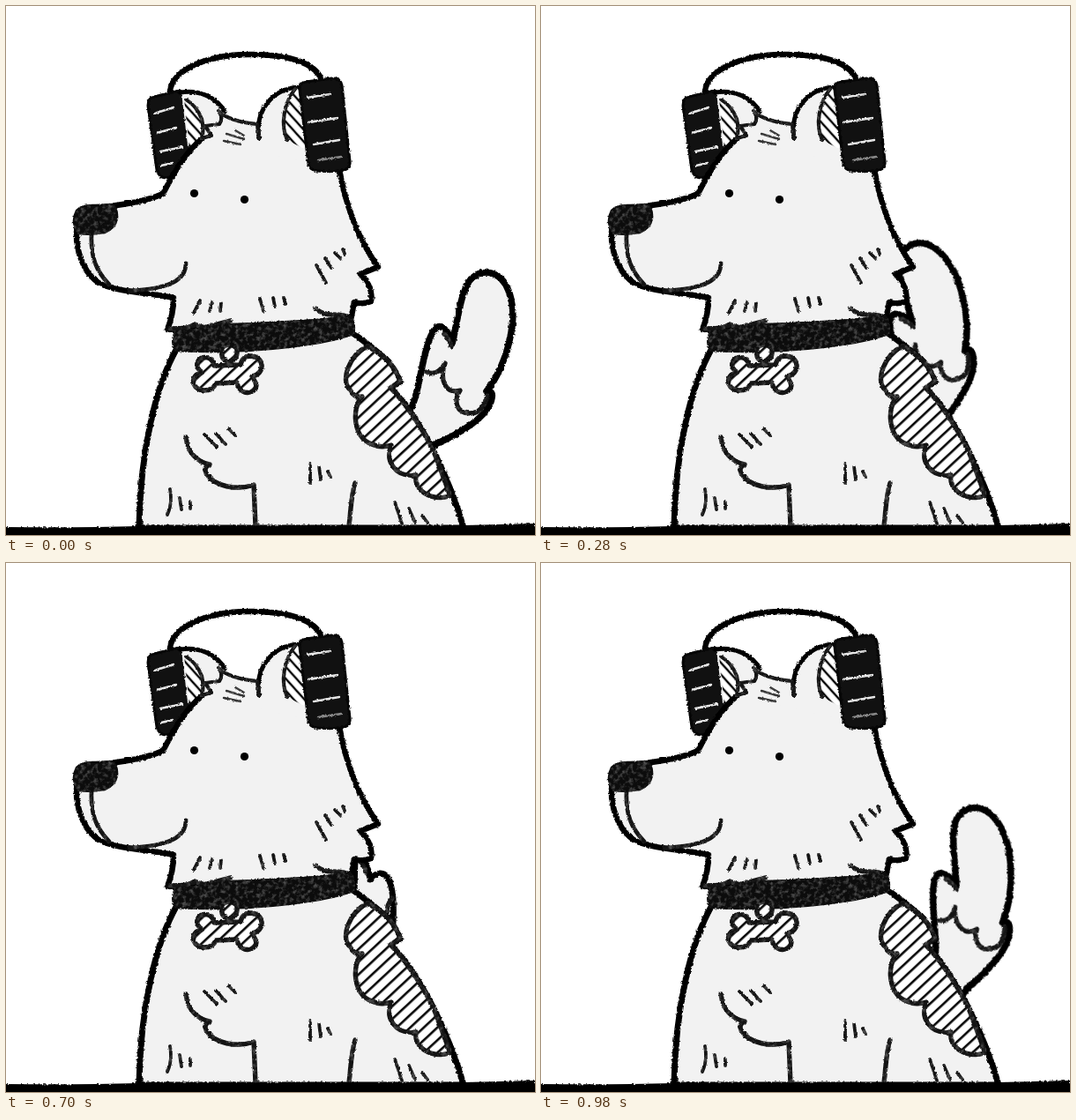
Animation, 600 px wide and 600 px high, one loop 1120 ms. Source, as an HTML page:

```html
<!DOCTYPE html>
<html lang="en">
<head>
<meta charset="utf-8">
<title>Dog with headphones</title>
<style>
  html, body { margin: 0; width: 100%; height: 100%; overflow: hidden; background: #fff; }
  svg { display: block; width: 100vw; height: 100vh; }
  path, circle { stroke-linecap: round; stroke-linejoin: round; }
  .outline { filter: url(#edge); fill: #f2f2f2; stroke: #000; stroke-width: 7; }
  .ink { filter: url(#ink); fill: none; stroke: #141414; stroke-width: 5.4; }
  .ink .thin { stroke-width: 3.8; }
  .ink .faint { stroke-width: 2.4; stroke: #333; }
  .solid { filter: url(#ink); fill: #0c0c0c; stroke: #0c0c0c; stroke-width: 2.5; }
  .cup { filter: url(#edge); fill: #111; stroke: #060606; stroke-width: 3; }
  .ground { filter: url(#edge); }
  .shine { filter: url(#edge); fill: none; stroke: #e8e8e8; stroke-width: 2.4; }
  .hatch { fill: url(#hatch); }
  .ear { fill: url(#ear-hatch); }
  .bare { stroke: none; }

  /* The tail swings behind the head and back in eight held poses. */
  .tail { transform-origin: 529px 367.7px; animation: wag 1.12s step-end infinite; }
  .stub { animation: peek 1.12s step-end infinite; }
  @keyframes wag {
    0%, 100% { transform: none; opacity: 1; }
    12.5%, 87.5% { transform: translate(-40px, -22px) rotate(-16deg); opacity: 1; }
    25%, 75% { transform: translate(-94px, -31px) rotate(-27deg); opacity: 1; }
    37.5%, 50%, 62.5% { opacity: 0; }
  }
  @keyframes peek {
    0%, 50%, 75%, 100% { opacity: 0; }
    37.5%, 62.5% { opacity: 1; }
  }
</style>
</head>
<body>
<svg viewBox="0 0 600 600">
  <defs>
    <filter id="edge" filterUnits="userSpaceOnUse" x="0" y="0" width="600" height="600" color-interpolation-filters="sRGB">
      <feTurbulence type="fractalNoise" baseFrequency=".35" numOctaves="2" seed="4"/>
      <feDisplacementMap in="SourceGraphic" scale="3.2" xChannelSelector="R" yChannelSelector="G"/>
    </filter>
    <filter id="ink" filterUnits="userSpaceOnUse" x="0" y="0" width="600" height="600" color-interpolation-filters="sRGB">
      <feTurbulence type="fractalNoise" baseFrequency=".35" numOctaves="2" seed="9" result="wobble"/>
      <feDisplacementMap in="SourceGraphic" in2="wobble" scale="2.6" xChannelSelector="R" yChannelSelector="G" result="line"/>
      <feTurbulence type="fractalNoise" baseFrequency=".2" numOctaves="3" seed="2"/>
      <feColorMatrix values="0 0 0 0 .3  0 0 0 0 .3  0 0 0 0 .3  3 0 0 0 -1.4"/>
      <feComposite in2="line" operator="atop"/>
    </filter>
    <pattern id="hatch" width="10.5" height="10.5" patternUnits="userSpaceOnUse" patternTransform="rotate(47)">
      <path d="M0 0H10.5V10.5H0Z" fill="#fff"/>
      <path d="M5 -1V12" stroke="#000" stroke-width="2.6"/>
    </pattern>
    <pattern id="ear-hatch" width="9" height="9" patternUnits="userSpaceOnUse" patternTransform="rotate(-42)">
      <path d="M0 0H9V9H0Z" fill="#fff"/>
      <path d="M4 -1V10" stroke="#000" stroke-width="2.4"/>
    </pattern>
  </defs>

  <g class="tail">
    <path class="outline" style="stroke-width:7.5" d="M440 500L462 450C470 430 473 390 483 372Q489 359 497 366Q504 372 506 383C512 360 515 325 527 310Q540 297 556 305C573 315 578 345 573 370C568 400 555 425 545 437Q553 436 551 445C548 465 515 485 487 497L470 510"/>
    <path class="ink" d="M477 415Q489 421 498 405C491 424 499 441 515 436C507 448 511 462 526 462Q541 462 546 442M497 372Q503 378 505 386"/>
  </g>
  <g class="stub">
    <path class="outline" d="M396 330L406 338Q412 348 413 359Q425 346 433 357Q441 370 439 408L395 375Z"/>
    <path class="ink" d="M432 397Q432 387 438 380M400 337Q407 343 408 351"/>
  </g>

  <!-- body -->
  <path class="outline" d="M194 388C170 430 152 505 151 592H519Q508 552 485 505Q462 460 436 433L447 426C440 406 425 394 392 370"/>
  <path class="hatch" d="M412 385C390 395 380 425 390 435Q395 445 404 443C392 455 393 490 415 497Q425 502 437 498C430 515 440 535 465 532C462 548 480 562 503 556Q495 528 485 505Q462 460 436 433L447 426Q438 403 412 385Z"/>
  <g class="ink">
    <path d="M410 386C389 396 379 425 390 435Q395 445 404 443C392 455 393 490 415 497Q425 502 437 498C430 515 440 535 465 532C462 548 480 562 503 556"/>
    <path d="M410 386Q439 401 447 426L436 433Q462 460 485 505L503 553"/>
    <path d="M204 489C206 506 216 517 231 520Q224 523 227 530C236 545 262 550 281 543L283 590M396 541C391 556 391 575 389 590"/>
    <path class="thin" d="M225 486L239 500M238 485L249 497M253 480L260 487M345 520V541M355 523L357 537M365 528L368 534M186 548Q189 564 183 577M197 558L199 571M209 562V570M441 563L449 587M457 570L464 586M472 578L478 586"/>
  </g>
  <path class="ground" d="M0 591Q80 592 150 590L520 589L600 587V604H0Z"/>

  <!-- headband and left cup -->
  <path class="outline" style="fill:none;stroke-width:6.5" d="M186 97C188 72 230 55 274 55C318 54 351 64 358 84"/>
  <path class="cup" d="M161 113Q161 104 168 103L192 97Q199 95 201 103L209 160L191 191Q184 197 177 194Q173 192 171 186Z"/>
  <path class="shine" d="M168 122L190 115M171 144L193 138M175 165L200 160M176 181L189 178"/>

  <!-- ears and crown -->
  <path class="outline bare" d="M199 98C220 94 240 106 248 120Q255 131 287 135C288 110 305 93 332 92L378 190L222 152L206 158Z"/>
  <path class="ear" d="M202 105Q214 110 222 128Q225 142 220 151L208 162Z"/>
  <path class="ear" d="M328 94C315 110 311 135 319 152L336 161L345 160L333 92Z"/>
  <path class="outline" style="fill:none;stroke-width:5" d="M198 98C220 94 240 105 248 120M287 150C282 118 303 93 333 92"/>

  <!-- head -->
  <path class="outline" style="stroke-width:6.5" d="M222 151C203 166 190 190 178 213C160 221 140 224 112 228L82 240C75 272 87 302 105 314C125 325 165 325 190 331Q190 350 183 367L200 366L250 364L391 356L395 336Q404 339 414 335Q417 319 402 304L422 296C400 265 385 225 378 185"/>
  <g class="ink">
    <path style="stroke-width:4.2" d="M204 106Q216 113 222 128Q225 141 222 150L233 147L226 136L242 134Q247 127 241 119Q253 131 285 134L287 150"/>
    <path style="stroke-width:4.2" d="M328 94C315 110 311 135 319 152"/>
    <path style="stroke-width:4.8" d="M97 260C96 285 102 300 117 316M204 292C204 311 185 321 140 323"/>
    <path d="M351 343Q360 351 372 350Q384 350 390 354M186 366Q203 368 214 361L224 365L254 357"/>
    <path class="faint" d="M247 153L266 157M250 145L270 151M260 141L270 147"/>
    <path class="thin" d="M352 294L363 314M362 286L369 297M373 280L380 287M382 276L384 281M220 334L213 348M234 336L231 346M244 337L243 346M288 332L292 346M303 331L305 341M315 331L317 338"/>
  </g>
  <path class="solid" d="M80 232Q85 225 102 226L120 225Q127 229 126 241Q124 252 112 257Q96 260 82 258Q73 245 80 232Z"/>
  <circle cx="213.5" cy="212.5" r="4.6"/>
  <circle cx="270.5" cy="219.5" r="4.6"/>

  <!-- collar and tag -->
  <path class="solid" d="M192 369Q186 382 193 391Q260 394 320 387Q370 381 394 372Q397 360 390 351Q340 360 250 361Q220 369 192 369Z"/>
  <circle class="hatch" cx="253" cy="395" r="8"/>
  <path class="hatch" d="M236 408C234 394 214 396 217 410L222 416C208 418 210 436 225 436Q235 436 238 428L262 427C264 442 284 442 284 429L279 420C294 418 294 398 278 397Q268 397 266 407Z"/>
  <g class="ink">
    <path d="M245 391Q243 402 253 403Q263 402 262 390"/>
    <path d="M236 408C234 394 214 396 217 410L222 416C208 418 210 436 225 436Q235 436 238 428L262 427C264 442 284 442 284 429L279 420C294 418 294 398 278 397Q268 397 266 407Z"/>
  </g>

  <!-- right cup -->
  <path class="cup" d="M333 94Q333 87 340 86L370 82Q379 81 381 90L390 176Q391 184 384 186Q370 189 353 187Q345 186 343 180Z"/>
  <path class="shine" d="M341 104L368 100M343 132L376 127M349 157L378 152"/>
  <path class="shine" style="stroke:#888" d="M354 175L380 171"/>
</svg>
</body>
</html>
```
